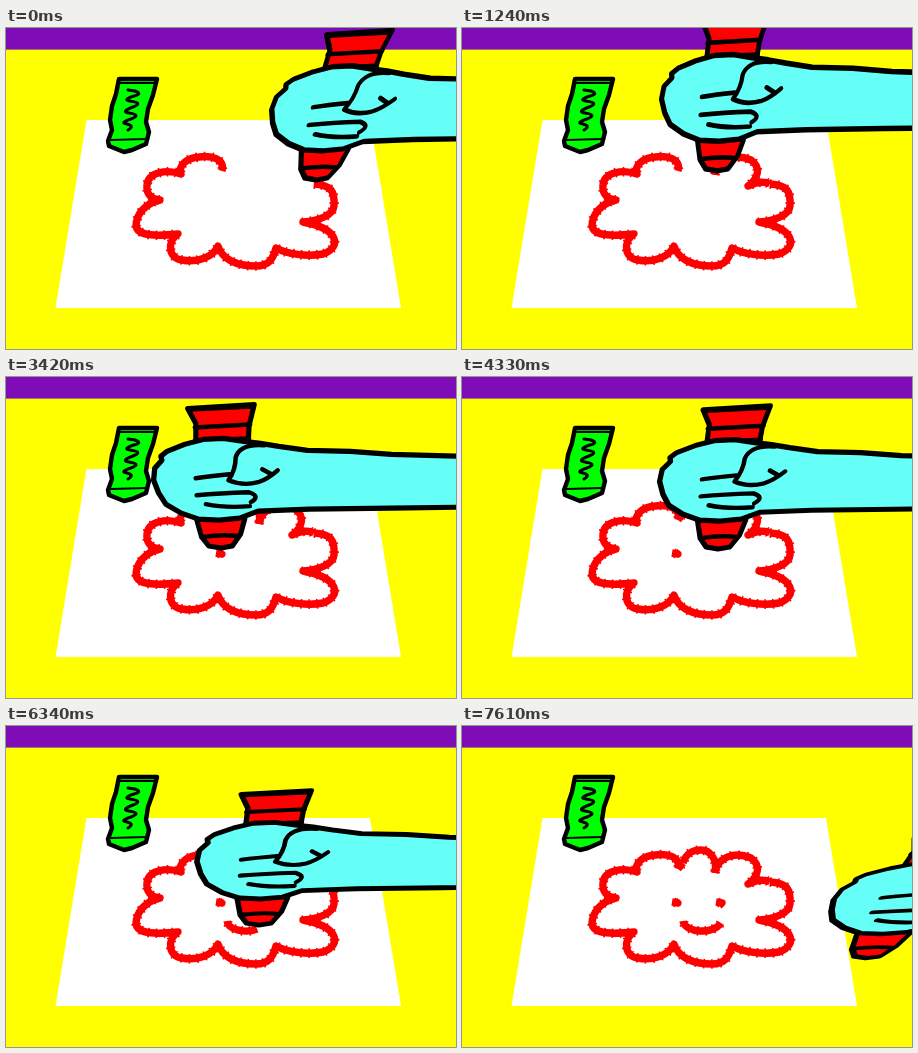
Animation of 450 by 321 pixels, one loop 7.91 s. Source, as an HTML page with a canvas:

```html
<!DOCTYPE html>
<html lang="en">
<head>
<meta charset="utf-8">
<title>Drawing a cloud</title>
<style>
html, body { margin: 0; width: 100%; height: 100%; overflow: hidden; background: #ff0; }
canvas { display: block; }
</style>
</head>
<body>
<canvas id="stage" width="450" height="321"></canvas>
<script>
const LOOP = 7910;
const RED = '#ff0000', BLACK = '#000', SKIN = '#66fff8';
const LIFT = 3; // gap between the crayon and the line it leaves
const ctx = document.getElementById('stage').getContext('2d');
ctx.lineCap = ctx.lineJoin = 'round';

// Runs of picture changes: first time, last time, count
const RUNS = [[150, 1100, 7], [1240, 2190, 7], [2340, 3250, 7], [3420, 4040, 5],
  [4330, 5270, 7], [5430, 6340, 7], [6510, 7140, 5], [7440, 7610, 2]];
const steps = [0];
for (const [from, to, n] of RUNS)
  for (let i = 0; i < n; i++) steps.push(from + (to - from) * i / (n - 1));

function measure(d) {
  const el = document.createElementNS('http://www.w3.org/2000/svg', 'path');
  el.setAttribute('d', d);
  const len = el.getTotalLength();
  const ticks = [];
  for (let s = 3; s < len; s += 8) {
    const p = el.getPointAtLength(s - 1), q = el.getPointAtLength(s + 1);
    const h = Math.hypot(q.x - p.x, q.y - p.y) || 1;
    ticks.push({ s, x: (p.x + q.x) / 2, y: (p.y + q.y) / 2, nx: (p.y - q.y) / h, ny: (q.x - p.x) / h });
  }
  return { el, len, ticks, shape: new Path2D(d) };
}

const outline = measure('M216 143 C219 131 206 127 193 129 C181 130 172 137 175 146 ' +
  'C161 141 142 144 141 157 C140 166 145 171 154 172 C139 175 130 187 130 198 C132 209 153 208 172 206 ' +
  'C160 214 163 231 176 232 C192 235 207 229 212 218 C216 231 230 238 250 238 C263 238 267 231 270 220 ' +
  'C281 226 301 229 317 226 C337 219 332 200 297 194 C313 193 327 187 328 178 C329 163 325 157 308 156');

// Tip movement: start, end, path, leaves a line
const legs = [
  [0, 1240, 'M308 156 C301 152 293 155 286 158 C297 150 299 139 289 132 C273 125 255 131 253 147', 1],
  [1240, 2340, 'M253 147 C256 132 247 124 239 124 C229 124 224 128 221 137', 1],
  [2340, 2500, 'M221 137 L216 143', 1],
  [2500, 3090, 'M216 143 L210 176', 0],
  [3090, 3420, 'M210 176 L216 177 L213 175', 1],
  [3420, 4040, 'M213 175 Q235 168 254 176', 0],
  [4330, 4490, 'M254 176 L260 177 L257 180', 1],
  [4490, 5270, 'M257 180 L221 195', 0],
  [5270, 6660, 'M221 195 C223 207 251 209 259 197', 1],
  [6660, 7140, 'M259 197 L350 163', 0],
  [7140, 7610, 'M350 163 L402 236', 0]
].map(([from, to, d, draws]) => ({ from, to, draws, ...measure(d) }));

function line(shape, width, color = BLACK) {
  ctx.lineWidth = width;
  ctx.strokeStyle = color;
  ctx.stroke(shape);
}

function solid(shape, color, width) {
  ctx.fillStyle = color;
  ctx.fill(shape);
  if (width) line(shape, width);
}

function crayonLine(path, part) {
  if (part <= 0) return;
  const end = path.len * part;
  ctx.lineCap = 'butt';
  ctx.setLineDash([end, 2000]);
  line(path.shape, 7.4, RED);
  ctx.setLineDash([]);
  for (const { s, x, y, nx, ny } of path.ticks) {
    if (s > end) break;
    const tick = new Path2D();
    tick.moveTo(x - nx * 4.8, y - ny * 4.8);
    tick.lineTo(x + nx * 4.8, y + ny * 4.8);
    line(tick, 1.6, RED);
  }
  ctx.lineCap = 'round';
}

const paper = new Path2D('M80.5 92 H364 L395 280 H49.5 Z');

const green = {
  body: new Path2D('M113 51 L151 51 L147 67 L142 81 L140 94 L143 104 L140 116 L126 122 L118 124 ' +
    'L103 118 L102 113 L106 102 L104 92 L106 78 L110 66 Z'),
  bands: new Path2D('M114 55 H149 M105 112 L140 111'),
  scribble: new Path2D('M122 62 L129 63 Q137 66 128 68 Q116 72 124 73 Q138 75 127 79 ' +
    'Q114 84 123 85 Q136 87 125 91 Q113 95 121 96 Q129 98 122 102')
};

// The hand rests with its crayon tip at 212,172
const red = {
  body: new Path2D('M181 31 L246 27 L241 48 L239 90 L237 142 L233 157 L225 169 L214 171 L202 169 ' +
    'L195 160 L190 142 L189 60 L189 46 Z'),
  bands: new Path2D('M183 32 L243 29 M188 50 L242 47 M189 63 L241 61 M195 160 Q215 157 231 159')
};
const hand = {
  body: new Path2D('M560 83 L450 79 L380 77 L340 74 L298 73 L270 69 L252 66 L236 64 L216 61 L196 62 ' +
    'L178 67 L161 74 L155 79 L156 83 L149 91 L148 103 L153 116 L160 127 L175 136 L192 142 L212 143 ' +
    'L232 141 L250 134 L300 132 L380 131 L450 130 L560 127'),
  folds: new Path2D('M189 101 Q202 99 222 97 M190 118 Q212 116 241 115 Q253 119 243 125 ' +
    'M199 127 Q218 131 242 129 M256 68 Q232 66 228 80 Q228 93 221 103 ' +
    'Q235 109 250 105 Q259 102 269 93 M254 92 L263 97')
};

function drawHand(tx, ty) {
  const wide = 0.96 + (ty - 134) * 0.0017;
  const tall = 1.08 - (ty - 134) * 0.0022;
  const lean = (tx - 212) * 0.0032;
  ctx.save();
  ctx.transform(wide, 0, -lean, tall, tx - wide * 212 + lean * 172, ty - tall * 172);
  solid(red.body, RED, 5);
  line(red.bands, 4.4);
  solid(hand.body, SKIN, 5.2);
  line(hand.folds, 4.4);
  ctx.restore();
}

function render(time) {
  const t = steps.findLast(s => s <= time + 0.01);
  ctx.fillStyle = '#ffff00';
  ctx.fillRect(0, 0, 450, 321);
  ctx.fillStyle = '#7f0db7';
  ctx.fillRect(0, 0, 450, 21.6);
  solid(paper, '#fff');

  crayonLine(outline, 1);
  let tip;
  for (const leg of legs) {
    const part = Math.min(1, (t - leg.from) / (leg.to - leg.from));
    if (part < 0) break;
    if (leg.draws) crayonLine(leg, part);
    tip = leg.el.getPointAtLength(leg.len * part);
  }

  solid(green.body, '#00ff00', 4.4);
  line(green.bands, 2);
  line(green.scribble, 3);
  drawHand(tip.x, tip.y - LIFT);
}

function tick() {
  render(performance.now() % LOOP);
  requestAnimationFrame(tick);
}
tick();
</script>
</body>
</html>
```
